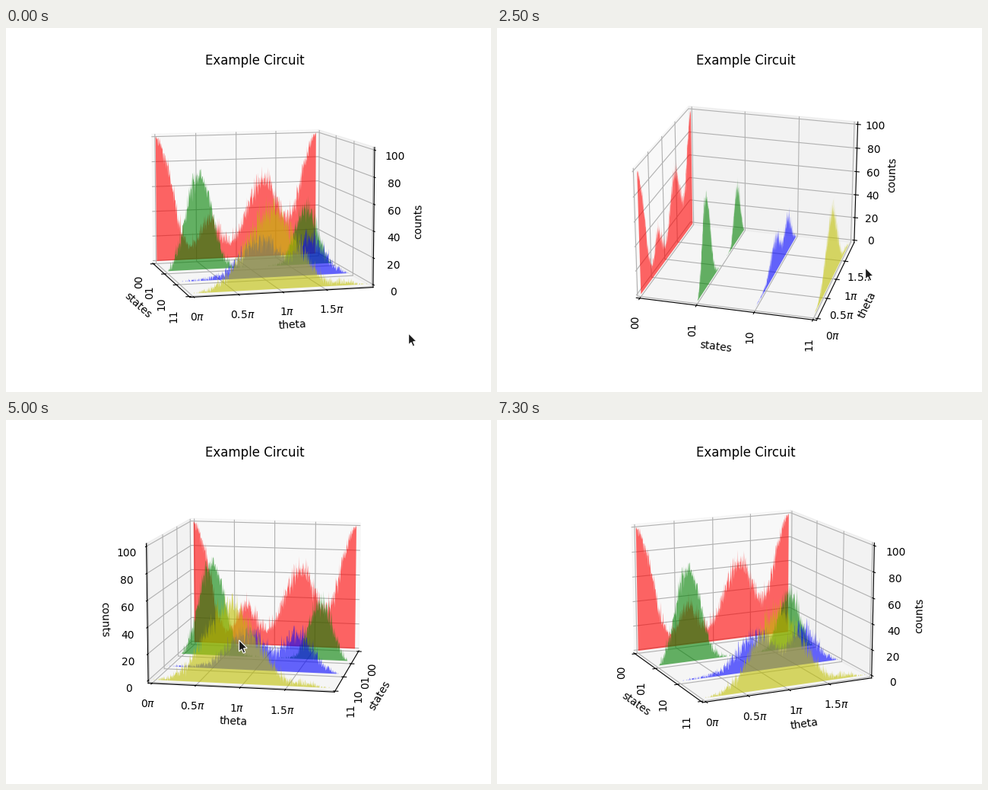
These frames come from a looping animation (638x478 px, 7.5 s). A matplotlib script:

```python
import numpy as np
import matplotlib.pyplot as plt
from matplotlib.animation import FuncAnimation
from matplotlib.collections import PolyCollection
from matplotlib.patches import Polygon
from matplotlib.transforms import IdentityTransform

W, H, DPI = 638, 478, 100
STEP, FRAMES = 100, 75
SHOTS = 100
LEAVE = 73  # the pointer has left the window from this step on

# Steps on which the hand rests; all motion is even between key poses otherwise.
RESTS = np.array([1, 2, 4, 7, 8, 22, 41, 42, 59, 61, 67])

# step, azimuth, elevation, pointer x, pointer y
POSES = np.array([
    (2, -15, 8.4, 529, 400),
    (6, -15, 8.4, 357, 288),
    (17, -59.7, 25.6, 450, 320),
    (21, -79, 24.6, 491, 316),
    (25, -75, 23.7, 484, 314),
    (30, -18, 21, 357, 310),
    (39, 36.4, 15.6, 245, 297),
    (50, 11, 10.7, 306, 288),
    (56, -18.1, 13.1, 362, 293),
    (66, -25, 14.4, 378, 293),
    (72, -25, 14.4, 125, 16),
])

ARROW = np.array([(0.6, 1), (0.6, 16), (4, 12.9), (6.3, 18.2),
                  (8.8, 17.1), (6.6, 11.9), (11.2, 11.6)])


def clock(step):
    """Number of moving steps up to the given step."""
    return step - np.searchsorted(RESTS, step, side="right")


def pose(step):
    times = clock(POSES[:, 0])
    return [np.interp(clock(step), times, col) for col in POSES[:, 1:].T]


def bump(f, height, center, width):
    """Bell curve on a full turn, f running from 0 to 1."""
    dist = (f - center + 0.5) % 1 - 0.5
    return height * np.exp(-(dist / width) ** 2)


def sample_counts(f):
    """Simulated measurement counts of the four states."""
    edge = np.clip(np.minimum(f, 1 - f) / 0.05, 0, 1)
    s00 = bump(f, 100, 0, 0.125) + bump(f, 30, 1 / 3, 0.09) + bump(f, 60, 2 / 3, 0.15)
    s01 = bump(f, 70, 0.185, 0.107) + bump(f, 48, 0.84, 0.092)
    s10 = bump(f, 25, 0.465, 0.145) + bump(f, 27, 0.765, 0.115) + 2 * np.sin(np.pi * f)
    s11 = bump(f, 54, 0.445, 0.2) + bump(f, 2, 0.86, 0.06)
    p = np.stack([s00, s01 * edge, s10 * edge, s11 * edge], axis=1)
    p /= p.sum(axis=1, keepdims=True)
    return np.random.default_rng(7).multinomial(SHOTS, p).T


def padded(lo, hi):
    pad = (hi - lo) / 48
    return lo - pad, hi + pad


fig = plt.figure(figsize=(W / DPI, H / DPI), dpi=DPI)
ax = fig.add_axes([79 / W, 51.8 / H, 496 / W, 369.6 / H], projection="3d")
ax.set_title("Example Circuit")

theta = np.arange(0, 2 * np.pi, 0.01)
verts = [[(0, 0), *zip(theta, counts), (theta[-1], 0)]
         for counts in sample_counts(theta / (2 * np.pi))]
hills = PolyCollection(verts, facecolors=["r", "g", "b", "y"], alpha=0.6)
ax.add_collection3d(hills, zs=range(4), zdir="x")

ax.set_xlabel("states")
ax.set_ylabel("theta")
ax.set_zlabel("counts")
ax.set_xticks(range(4), [f"{n:02b}" for n in range(4)], rotation=90)
ax.set_yticks(np.arange(4) * np.pi / 2, [rf"{n / 2:g}$\pi$" for n in range(4)])
ax.set_zticks(range(0, SHOTS + 1, 20))
ax.set_xlim(*padded(0, 3))
ax.set_ylim(*padded(0, 2 * np.pi))
ax.set_zlim(*padded(0, SHOTS))

pointer = Polygon(ARROW, closed=True, facecolor="#1c1c1c", edgecolor="white",
                  linewidth=0.8, zorder=10, transform=IdentityTransform())
fig.add_artist(pointer)


def update(step):
    azim, elev, x, y = pose(step)
    ax.view_init(elev=elev, azim=azim)
    pointer.set_xy(np.column_stack([x + ARROW[:, 0], H - y - ARROW[:, 1]]))
    pointer.set_visible(step < LEAVE)
    return ax, pointer


anim = FuncAnimation(fig, update, frames=FRAMES, interval=STEP,
                     init_func=lambda: update(0), repeat=True, repeat_delay=0)
plt.show()
```
